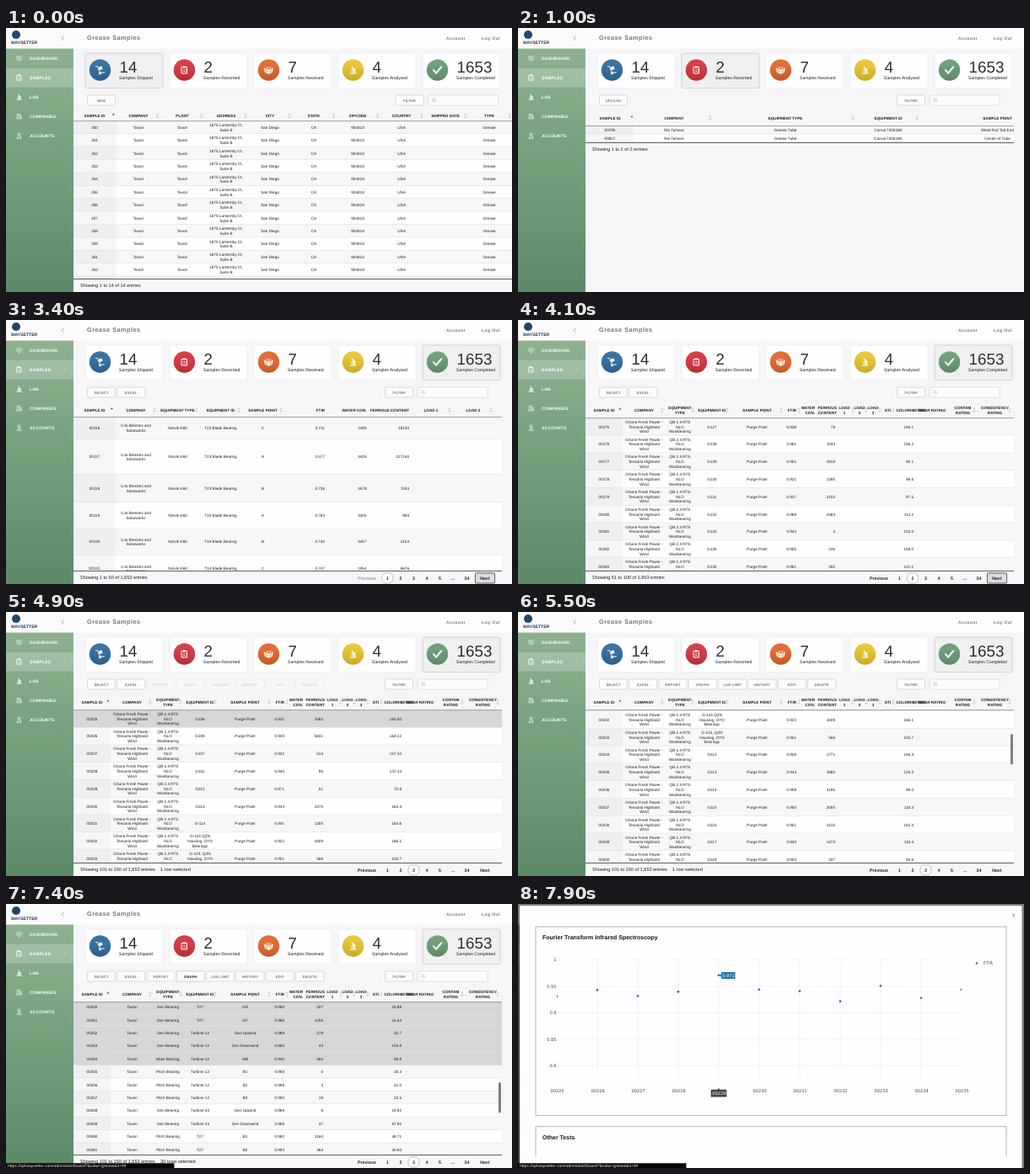
Recreate the animation shown at these times as an HTML page. Size 600 px wide and 314 px high, loop 8 s.

```html
<!DOCTYPE html>
<html lang="en">
<head>
<meta charset="utf-8">
<title>Grease Samples</title>
<style>
  html, body { margin: 0; width: 100%; height: 100%; overflow: hidden; background: #f6f5f7; }
  svg { display: block; width: 600px; height: 314px; }
  text { font-family: "Liberation Sans", Arial, sans-serif; text-rendering: geometricPrecision; }
  .plot text { font-family: "DejaVu Sans", Verdana, sans-serif; }
</style>
</head>
<body>
<svg id="stage" viewBox="0 0 600 314" xmlns="http://www.w3.org/2000/svg"></svg>
<script>
const LOOP = 8000;
const INK = '#1d1d20';

// ---------- drawing helpers ----------
// Text is placed by its vertical centre; "|" breaks lines.
function text(x, y, str, size = 4.65, o = {}) {
  const lines = String(str).split('|');
  const gap = o.gap || 5.7;
  const attrs = `font-size="${size}" fill="${o.fill || INK}" text-anchor="${o.anchor || 'middle'}"`
    + (o.bold ? ' font-weight="700"' : '') + (o.ls ? ` letter-spacing="${o.ls}"` : '');
  return lines.map((line, i) => {
    const base = y + size * 0.36 + (i - (lines.length - 1) / 2) * gap;
    return `<text x="${x}" y="${base.toFixed(2)}" ${attrs}>${line}</text>`;
  }).join('');
}
const rect = (x, y, w, h, fill, more = '') =>
  `<rect x="${x}" y="${y}" width="${w}" height="${h}" fill="${fill}" ${more}/>`;
const path = (d, stroke = '#fff', w = 1, fill = 'none') =>
  `<path d="${d}" stroke="${stroke}" stroke-width="${w}" fill="${fill}" stroke-linecap="round" stroke-linejoin="round"/>`;
const group = (id, body, more = '') => `<g id="${id}" ${more}>${body}</g>`;
const at = (x, y, body) => `<g transform="translate(${x} ${y})">${body}</g>`;

function button(x, label, fill = '#77777c') {
  return rect(x + 0.5, 80, 33, 12, '#fcfbfd', 'rx="1" stroke="#cfced2" stroke-width=".7"')
    + text(x + 17, 86.2, label, 4.2, { bold: true, fill, ls: 0.1 });
}

// ---------- frame of the page ----------
const clipboard = path('M-3-3.5H3V4H-3Z', '#fff', 1) + rect(-1.5, -4.6, 3, 2, '#fff')
  + path('M-1.3-.5H1.5M-1.3 1.7H1.5', '#fff', 0.7);
const scope = path('M-1-4L1 0M-2 0H2M1.5-1.5Q4 1 1 3M-3.5 4H3.5M-2 2H1', '#fff', 1.2);
const sideIcons = [
  path('M0-3.5L3-2V1.5L0 3.5L-3 1.5V-2Z M0-1V1', '#fff', 0.9),
  clipboard, scope,
  path('M-3 3.5V-3.5H1V3.5M1-1H3V3.5M-3.5 3.5H3.5M-1.5-1.5H-.5M-1.5 1H-.5', '#fff', 0.8),
  '<circle cy="-1.8" r="1.8" fill="none" stroke="#fff" stroke-width=".9"/>' + path('M-3 3.6Q-2.500 .8 0 .8T3 3.6Z', '#fff', 0.9)
];

function sidebar() {
  const names = ['DASHBOARD', 'SAMPLES', 'LAB', 'COMPANIES', 'ACCOUNTS'];
  return rect(0, 0, 80, 314, 'url(#side)') + rect(0, 0, 80, 24.5, '#fbfbfc')
    + '<circle cx="12" cy="8" r="5" fill="#21466a"/>'
    + text(6, 16.8, 'WAYSETTER', 5.1, { bold: true, fill: '#1d3557', anchor: 'start' })
    + path('M68.3 9.7L66 12.2L68.3 14.7', '#8f9f96', 0.8)
    + rect(0, 48, 80, 22.5, '#fff', 'opacity=".2"')
    + path('M68.4 57.3L70 59L68.4 60.7', '#c9dccb', 0.7)
    + names.map((n, i) => at(15.5, 36 + 23 * i, `<g transform="scale(.8)">${sideIcons[i]}</g>`)
      + text(28, 36.2 + 23 * i, n, 5, { bold: true, fill: '#fff', anchor: 'start', ls: 0.15 })).join('');
}

const topbar = () => rect(80, 0, 520, 24.5, '#fdfcfe')
  + text(96, 11.8, 'Grease Samples', 7.3, { bold: true, fill: '#77767c', anchor: 'start', ls: 0.48 })
  + text(522, 11.7, 'Account', 5, { bold: true, fill: '#77767c', anchor: 'start', ls: 0.4 })
  + text(564, 11.7, 'Log Out', 5, { bold: true, fill: '#77767c', anchor: 'start', ls: 0.4 });

const cardList = [
  ['14', 'Shipped', '#2f6c9f', path('M-5-4.5H-3L0 3H5', '#fff', 1) + rect(-0.6, -3.8, 4, 3.8, '#fff', 'transform="rotate(-20)"')
    + '<circle cx="0" cy="4" r="1.4" fill="#fff"/>'],
  ['2', 'Recorded', '#d6343d', clipboard],
  ['7', 'Received', '#e3672c', path('M-5-2L0 0L5-2L4 2.5L0 4.5L-4 2.5Z', '#fff', 0.8, '#f6c6a8') + path('M0 0V4.5M-2.5-3.5L0-2L2.5-3.5', '#fff', 0.9)],
  ['4', 'Analyzed', '#e9c52c', scope],
  ['1653', 'Completed', '#6a9c74', path('M-4.5 .3L-1.3 3.7L4.8-3.8', '#fff', 2)]
];
function cards() {
  return cardList.map(([n, word, color, icon], i) => {
    const x = 94 + 100 * i;
    return rect(x, 30, 92, 41.5, '#fefdff', 'rx="2" stroke="#ebeaed" stroke-width=".7"')
      + group('hot' + i, rect(x, 30, 92, 41.5, '#f0eff1', 'rx="2" stroke="#c9c8cb" stroke-width=".7"'))
      + `<circle cx="${x + 17.5}" cy="50" r="12.7" fill="${color}"/>`
      + `<circle cx="${x + 17.5}" cy="50" r="12.7" fill="url(#tint)"/>`
      + at(x + 17.5, 50, icon)
      + text(x + 40.6, 46, n, 18.8, { anchor: 'start', fill: '#2f2f33' })
      + text(x + 40, 59.6, 'Samples ' + word, 5.1, { anchor: 'start' });
  }).join('');
}

const searchBar = () => button(461.5, 'FILTER')
  + rect(500.5, 80, 83, 12, '#fcfbfd', 'rx="1.5" stroke="#d5d4d8" stroke-width=".7"')
  + '<circle cx="507" cy="85.7" r="1.7" fill="none" stroke="#a5a5aa" stroke-width=".6"/>'
  + path('M508.3 87L509.5 88.2', '#a5a5aa', 0.6);

// ---------- tables ----------
// cols: [title, x, anchor, cell x]; rows: { h, cells, sel }
function sorter(x, y, on) {
  const up = `<path d="M${x - 1.7} ${y - 0.7}h3.4l-1.7-2.6z" fill="${on ? '#5f7488' : '#d0cfd4'}"/>`;
  return up + (on ? '' : `<path d="M${x - 1.7} ${y + 0.7}h3.4l-1.7 2.6z" fill="#d0cfd4"/>`);
}
function table({ id, cols, rows, top, head, right = 588, idEdge, marks, bottom = 298.5 }) {
  const width = right - 80;
  let y = top, bg = '', labels = '', one = '', many = '';
  rows.forEach((r, i) => {
    bg += rect(80, y, width, r.h, i % 2 ? '#fefdff' : '#f7f6f8')
      + rect(80, y, idEdge - 80, r.h, i % 2 ? '#f6f5f7' : '#efeef0');
    const fill = rect(80, y, width, r.h, '#d8d6d9');
    if (r.sel === 1) one += fill;
    if (r.sel === 2) many += fill;
    labels += rect(80, y + r.h - 0.5, width, 0.5, '#dcdbde');
    r.cells.forEach((c, k) => {
      if (c !== '') labels += text(cols[k][3] || cols[k][1], y + r.h / 2, c, 4.65, { anchor: cols[k][2] });
    });
    y += r.h;
  });
  const end = Math.min(y, bottom);
  return group(id,
    `<clipPath id="${id}Clip">${rect(80, top, width, bottom - top, '#000')}</clipPath>`
    + `<g clip-path="url(#wide${right})">`
    + marks.map((x, i) => sorter(x, head, i === 0)).join('')
    + cols.map(([t, x, anchor]) => text(x, head, t, 4.6, { bold: true, anchor })).join('')
    + `<g clip-path="url(#${id}Clip)">` + group(id + 'Rows', bg + group(id + 'One', one) + group(id + 'Many', many) + labels)
    + '</g>' + rect(80, top - 0.1, width, 0.7, '#7d7c80') + rect(80, end - 0.3, width, 0.9, '#47464a') + '</g>');
}
const entries = (str, y = 306) => text(88, y, str, 5.55, { anchor: 'start' });

const shipCols = ['SAMPLE ID', 'COMPANY', 'PLANT', 'ADDRESS', 'CITY', 'STATE', 'ZIPCODE', 'COUNTRY', 'SHIPPED DATE', 'TYPE']
  .map((t, i) => [t, 105 + 52 * i]);
const shipRows = [...Array(14).keys()].map(i => ({
  h: 15.4,
  cells: [250 + i + (i > 9), 'Tavori', 'Tavori', '1875 Lanternby Ct,|Suite B', 'San Diego', 'CA', '904418', 'USA', '', 'Grease']
}));

const testCols = [['SAMPLE ID', 109], ['COMPANY', 185], ['EQUIPMENT TYPE', 317], ['EQUIPMENT ID', 439], ['SAMPLE POINT', 568.5]];
const tube = ['Rio Tamaro', 'Grease Tube', 'Corval 730518K'];
const pharma = 'Halden Orwick Sturre';
const received = [
  ['00795', ...tube, 'Metal Pull Tab End'],
  ['00827', ...tube, 'Center of Tube'],
  ['00834', ...tube, 'Plastic Cap End'],
  ['01394', pharma, 'N/A', 'N/A', 'Sample taken from a new grease tube lot'],
  ['01395', pharma, 'N/A', 'N/A', 'Open cartridge in grease shop room'],
  ['01396', pharma, 'Straight-Through Coupling Fan Bearing', 'FN1224001A', 'Grease discharge port, west side'],
  ['Sample5', 'Demo', 'Gen Bearing', 'A21', 'GB']
];
function shortTable(id, list) {
  const n = list.length;
  return table({
    id, cols: testCols, rows: list.map(cells => ({ h: 9.95, cells })), top: 116.3, head: 107,
    idEdge: 137, marks: [135, 228, 397, 473]
  }).replace(/<\/g>$/, entries(`Showing 1 to ${n} of ${n} entries`, 123.7 + 9.95 * n) + '</g>');
}

const firstCols = [['SAMPLE ID', 105], ['COMPANY', 154], ['EQUIPMENT TYPE', 203.5], ['EQUIPMENT ID', 254.5], ['SAMPLE POINT', 304.5],
  ['FTIR', 378, 'end'], ['WATER CON.', 427.5, 'end'], ['FERROUS CONTENT', 478, 'end'], ['LOAD 1', 504], ['LOAD 2', 554]];
const firstRows = [
  [26.5, '00116', 'T23', 'C', '0.711', 1495, 18120], [42, '00117', 'T23', 'A', '0.577', 4405, 227140],
  [33, '00118', 'T23', 'B', '0.736', 4578, 7043], [31, '00119', 'T34', 'A', '0.763', 4305, 894],
  [32, '00120', 'T34', 'B', '0.740', 4457, 2104], [32, '00121', 'T34', 'C', '0.747', 1954, 6676]
].map(([h, n, t, p, ...nums]) => ({
  h, cells: [n, 'U.lo Breezes and|Solarworks', 'Norvik K60', t + ' Blade Bearing', p, ...nums]
}));

const wideCols = [['SAMPLE ID', 102], ['COMPANY', 149.5], ['EQUIPMENT|TYPE', 192], ['EQUIPMENT ID', 230], ['SAMPLE POINT', 283.5],
  ['FTIR', 330, 'end'], ['WATER|CON.', 352, 'end'], ['FERROUS|CONTENT', 378, 'end', 376], ['LOAD|1', 387], ['LOAD|2', 405],
  ['LOAD|3', 421], ['GTI', 438.5], ['COLORIMETRIC', 484, 'end', 469], ['WEAR RATING', 507, 'end'], ['CONTAM|RATING', 527.5], ['CONSISTENCY|RATING', 565.5]];
const wideMarks = [121, 171, 207, 248, 312, 333, 397, 413, 429, 445, 541, 583];

const ftir = [0.931, 0.943, 0.932, 0.94, 0.971, 0.944, 0.941, 0.922, 0.951, 0.928, 0.944];
const ferrous = [2583, 5831, 514, 95, 51, 2470, 1305, 4409, 566];
const color = ['165.50', '164.12', '157.10', '137.14', '70.8', '164.3', '163.6', '166.1', '150.7'];
const unit = ['G106', 'G109', 'G107', 'G101', 'G112', 'G113', 'G-114', 'G-124 QZN|Housing, OYD|Bearings', 'G-123, QZN|Housing, OYD|Bearings'];
const noise = n => Math.abs(Math.sin(n * 12.9898) * 43758.5453) % 1;

function tallRow(num, i, known) {
  const f = known && ftir[i] || 0.92 + noise(num) * 0.05;
  return {
    h: 20.8,
    cells: ['00' + num, 'Orlune Fresh Power -|Tessaria Highland|Wind', 'QB 2.4 RTS|NLO|Mainbearing',
      known && unit[i] || 'G' + (100 + num % 37), 'Purge Point', f.toFixed(3), '',
      known && ferrous[i] || Math.floor(noise(num + 3) * 3000), '', '', '', '',
      known && color[i] || (90 + noise(num + 7) * 80).toFixed(1)]
  };
}
const bearings = [
  ['Gen', 'T27', 'GR', '0.985', 327, '25.88'], ['Gen', 'T27', 'GF', '0.986', 1255, '22.64'],
  ['Gen', 'Turbine 12', 'Gen Upwind', '0.989', 278, '50.7'], ['Gen', 'Turbine 12', 'Gen Downwind', '0.862', 43, '103.8'],
  ['Main', 'Turbine 12', 'MB', '0.940', 265, '89.8'], ['Pitch', 'Turbine 12', 'B1', '0.993', 0, '28.3'],
  ['Pitch', 'Turbine 12', 'B2', '0.998', 3, '51.0'], ['Pitch', 'Turbine 12', 'B3', '0.992', 19, '23.5'],
  ['Gen', 'Turbine 34', 'Gen Upwind', '0.989', 8, '19.82'], ['Gen', 'Turbine 34', 'Gen Downwind', '0.988', 37, '87.92'],
  ['Pitch', 'T27', 'B1', '0.982', 1160, '48.71'], ['Pitch', 'T27', 'B2', '0.993', 364, '30.50']
];
function shortRow(num) {
  const [kind, eq, point, f, iron, tint] = bearings[(num - 250 + 24) % 12];
  return { h: 15.4, cells: ['00' + num, 'Tavori', kind + ' Bearing', eq, point, f, '', iron, '', '', '', '', tint] };
}
const secondRows = [...Array(9).keys()].map(i => tallRow(175 + i, i, false));
const thirdRows = [...Array(38).keys()].map(i => ({
  ...(i < 17 ? tallRow(225 + i, i, true) : shortRow(225 + i)),
  sel: i === 0 ? 1 : i < 30 ? 2 : 0
}));
const scrollEnd = thirdRows.slice(0, 25).reduce((sum, r) => sum + r.h, 0) + 1.6;
const wideTable = (id, rows) => table({ id, cols: wideCols, rows, top: 116.5, head: 107.2, idEdge: 124, marks: wideMarks });

function pager(page) {
  const o = { bold: true };
  const spots = [['1', 452.3], ['2', 468], ['3', 483.5], ['4', 499], ['5', 514.5], ['…', 530], ['34', 546.5]];
  return rect(spots[page - 1][1] - 6.5, 301, 13, 12, '#fff', 'rx="5" stroke="#a9a8ad" stroke-width=".7"')
    + text(428, 307, 'Previous', 5.2, { bold: true, fill: page > 1 ? INK : '#98979c' })
    + spots.map(([s, x]) => text(x, 307, s, 5.2, o)).join('')
    + entries(`Showing ${page * 50 - 49} to ${page * 50} of 1,653 entries`);
}

// ---------- chart dialog ----------
function dialog() {
  const px = i => 46 + 48 * i, py = v => 66.5 + (1 - v) * 630;
  const label = (x, y, s, anchor, fill = '#444') => text(x, y, s, 5.1, { anchor, fill });
  let plot = '';
  for (let i = 1; i < 10; i++) plot += rect(px(i) - 0.25, 64, 0.5, 143, '#e9e8eb');
  for (let k = 0; k < 5; k++) {
    const v = 1 - k * 0.05;
    plot += rect(46, py(v) - 0.25, 480, 0.5, '#e9e8eb') + label(45.5, py(v), String(+v.toFixed(2)), 'end');
  }
  const dots = ftir.map((v, i) => `<circle cx="${px(i)}" cy="${py(v)}" r="1.35" fill="#1f77b4"/>`).join('');
  plot += ftir.map((v, i) => label(px(i) + 0.7, 222, '00' + (225 + i))).join('')
    + `<g clip-path="url(#plot)">${dots}</g>`
    + '<circle cx="544" cy="70.5" r="1.35" fill="#1f77b4"/>' + label(552, 70.5, 'FTIR', 'start')
    + group('tip', '<path d="M238.5 85l2.7-1.8V81H257.5v8H241.2v-2.2z" fill="#1f77b4"/>' + label(249.5, 85, '0.971', 'middle', '#fff')
      + '<path d="M238 219l1.7 2H247.3v8.5H228.7v-8.5H236.3z" fill="#444"/>' + label(238.3, 225.3, '00229', 'middle', '#fff'));
  const title = (y, s) => text(29, y, s, 7, { bold: true, anchor: 'start', fill: '#111' });
  return rect(2, 2, 595.5, 314, '#fefdff', 'rx="1"')
    + text(587.5, 12.5, 'x', 6.5, { fill: '#555' })
    + rect(21, 27, 558, 224.7, 'none', 'stroke="#a3a2a6" stroke-width=".8"')
    + path('M21 300V264.7H579V300', '#a3a2a6', 0.8)
    + title(39.3, 'Fourier Transform Infrared Spectroscopy') + title(277, 'Other Tests')
    + `<g class="plot">${plot}</g>`;
}

// ---------- assembly ----------
const actions = ['REPORT', 'GRAPH', 'LAB LIMIT', 'HISTORY', 'EDIT', 'DELETE'];
const stage = document.getElementById('stage');
stage.innerHTML = `<defs>
  <linearGradient id="side" x2="0" y2="1"><stop offset="0" stop-color="#92b493"/><stop offset="1" stop-color="#5b8a66"/></linearGradient>
  <linearGradient id="tint" x2="0" y2="1"><stop offset="0" stop-color="#fff" stop-opacity=".06"/><stop offset="1" stop-opacity=".14"/></linearGradient>
  <clipPath id="wide588"><rect x="80" y="94" width="508" height="206"/></clipPath>
  <clipPath id="wide600"><rect x="80" y="94" width="520" height="206"/></clipPath>
  <clipPath id="plot"><rect x="46" y="62" width="480" height="146"/></clipPath></defs>`
  + rect(0, 0, 600, 314, '#f6f5f7') + topbar() + sidebar() + cards()
  + group('search', searchBar())
  + group('btnNew', button(96, 'NEW')) + group('btnUpload', button(96, 'UPLOAD'))
  + group('btnPick', button(96, 'SELECT') + button(131.3, 'EXCEL'))
  + group('btnMore', actions.map((s, i) => button(166.6 + 35.3 * i, s)).join(''))
  + group('graphHover', button(201.9, 'GRAPH', '#222'))
  + group('shipped', table({
    id: 'ship', cols: shipCols, rows: shipRows, top: 110.5, head: 104.5, right: 600, idEdge: 131,
    marks: shipCols.map((c, i) => 127.3 + 52.2 * i)
  }) + entries('Showing 1 to 14 of 14 entries'))
  + shortTable('recorded', received.slice(0, 2)) + shortTable('received', received) + shortTable('analyzed', received.slice(2, 6))
  + table({ id: 'first', cols: firstCols, rows: firstRows, top: 115.3, head: 107, idEdge: 129.5, marks: [125.5, 176, 226, 276, 326, 526, 575] })
  + wideTable('second', secondRows) + wideTable('third', thirdRows)
  + group('thumb', rect(584, 116, 3, 36.5, '#7d7c80', 'rx="1.5"'))
  + group('nextHover', rect(556.5, 301, 23, 12, '#dddcdf', 'rx="1" stroke="#3a393d" stroke-width=".8"'))
  + [1, 2, 3].map(p => group('pager' + p, pager(p))).join('')
  + group('next', text(567.8, 307, 'Next', 5.2, { bold: true }))
  + group('note1', text(183, 306, '1 row selected', 5.55, { anchor: 'start' }))
  + group('note30', text(183, 306, '30 rows selected', 5.55, { anchor: 'start' }))
  + group('shade', rect(0, 0, 600, 314, '#000', 'opacity=".5"')) + group('dialog', dialog())
  + group('status', rect(0, 308.3, 199.5, 5.7, '#050505')
    + text(2, 311.2, 'https://qvlwaysetter.com/admindashboard?&amp;view=grease&amp;s=4#', 5, { anchor: 'start', fill: '#f2f2f2' }));

// Visible spans in ms
const spans = {
  shipped: [0, 600], recorded: [600, 1300], received: [1300, 2400], analyzed: [2400, 2900],
  first: [2900, 3700], second: [3700, 4200], third: [4200, LOOP],
  hot0: [0, 600], hot1: [600, 1300], hot2: [1300, 2400], hot3: [2400, 2900], hot4: [2900, LOOP],
  btnNew: [0, 600], btnUpload: [600, 2900], btnPick: [2900, LOOP], btnMore: [4800, LOOP],
  pager1: [2900, 3700], pager2: [3700, 4200], pager3: [4200, LOOP], next: [2900, LOOP], nextHover: [3300, 4500],
  thirdOne: [4800, LOOP], thirdMany: [6900, LOOP], note1: [4800, 6900], note30: [6900, LOOP],
  thumb: [5100, LOOP], graphHover: [7200, LOOP], status: [7200, LOOP],
  shade: [7500, LOOP], dialog: [7500, LOOP], tip: [7800, LOOP]
};
const el = {};
[...Object.keys(spans), 'search', 'thirdRows'].forEach(id => { el[id] = document.getElementById(id); });
const ramp = (t, a, b) => Math.min(1, Math.max(0, (t - a) / (b - a)));
const ease = p => p * p * (3 - 2 * p);
const move = (node, x, y) => node.setAttribute('transform', `translate(${x} ${y.toFixed(2)})`);

function draw(t) {
  for (const id in spans) el[id].style.display = t >= spans[id][0] && t < spans[id][1] ? '' : 'none';
  move(el.search, t < 600 ? 0 : -12.5, 0);
  const scroll = ease(ramp(t, 5100, 6200));
  move(el.thirdRows, 0, -scrollEnd * scroll);
  move(el.thumb, 0, 96 * scroll);
  el.btnMore.style.opacity = ramp(t, 4800, 5200);
  const open = ramp(t, 7450, 7700);
  el.shade.style.opacity = open;
  el.dialog.style.opacity = open;
  move(el.dialog, 0, -30 * (1 - ease(open)));
}

const start = performance.now();
function tick() {
  draw((performance.now() - start) % LOOP);
  requestAnimationFrame(tick);
}
tick();
</script>
</body>
</html>
```
